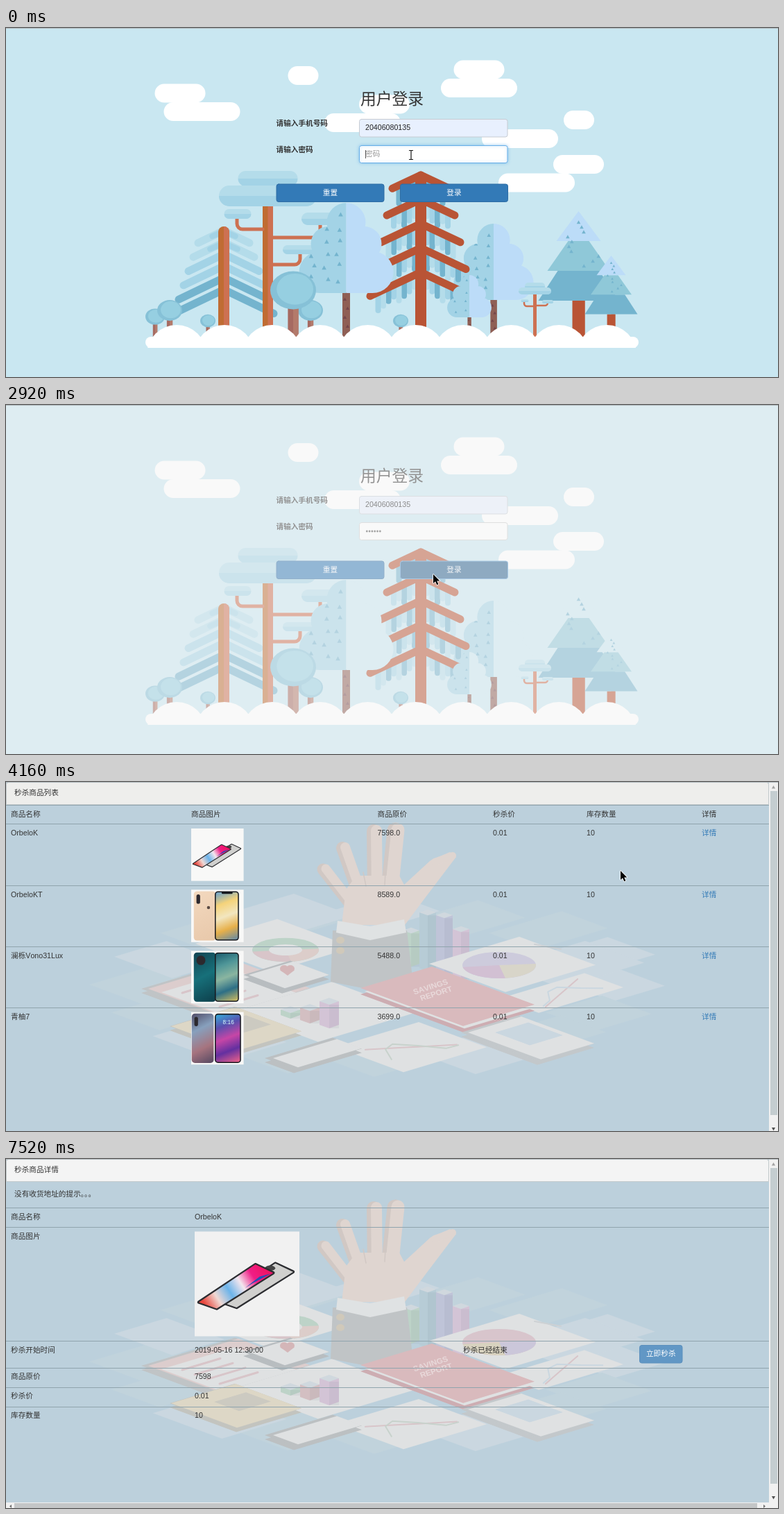
Animation of 1113x503 px, one loop 8000 ms. Source, as an HTML page with a canvas:

```html
<!DOCTYPE html>
<html lang="zh">
<head>
<meta charset="utf-8">
<style>
html, body { margin: 0; width: 100%; height: 100%; overflow: hidden; background: #c9e7f1; }
canvas { display: block; width: 1113px; height: 503px; }
</style>
</head>
<body>
<canvas id="stage" width="1113" height="503"></canvas>
<script>
const W = 1113, H = 503, LOOP = 8000;
const c = document.getElementById('stage').getContext('2d');
const SKY = '#c9e7f1', LIGHT = '#b4dcea', MID = '#a3d3e6', DEEP = '#74b4ce', TEAL = '#8fc8d8';
const RUST = '#b95435', CORAL = '#cd7152', OCHRE = '#c06c33', BROWN = '#8f5f55';
const FONT = "'Liberation Sans','Noto Sans CJK SC','Noto Sans CJK',sans-serif";
const UI = "'Open Sans','Noto Sans CJK SC','Noto Sans CJK',sans-serif";

// drawing helpers
function rect(x, y, w, h, fill) { c.fillStyle = fill; c.fillRect(x, y, w, h); }
function round(x, y, w, h, r, fill, stroke) {
  c.beginPath(); c.roundRect(x, y, w, h, r);
  if (fill) { c.fillStyle = fill; c.fill(); }
  if (stroke) { c.strokeStyle = stroke; c.lineWidth = 1; c.stroke(); }
}
function pill(x, y, w, h, fill) { round(x, y, w, h, h / 2, fill); }
function oval(x, y, rx, ry, fill, a = 0, b = Math.PI * 2) {
  c.beginPath();
  if (b - a < 6) c.moveTo(x, y);
  c.ellipse(x, y, rx, ry, 0, a, b); c.fillStyle = fill; c.fill();
}
function trace(points) {
  c.beginPath();
  for (const [x, y] of points) c.lineTo(x, y);
}
function poly(fill, ...points) { trace(points); c.closePath(); c.fillStyle = fill; c.fill(); }
function line(color, width, ...points) {
  trace(points); c.strokeStyle = color; c.lineWidth = width;
  c.lineCap = c.lineJoin = 'round'; c.stroke();
}
function text(s, x, y, { size = 10.65, color = '#333', bold = '', align = 'left', font = FONT } = {}) {
  c.font = `${bold} ${size}px ${font}`; c.fillStyle = color; c.fontKerning = 'none';
  c.textAlign = align; c.textBaseline = 'middle';
  c.fillText(s, x, y);
}
function tri(x, y, r, fill) { poly(fill, [x, y - r], [x + r, y + r * .8], [x - r, y + r * .8]); }
function gradient(x0, y0, x1, y1, colors) {
  const g = c.createLinearGradient(x0, y0, x1, y1);
  colors.forEach((k, i) => g.addColorStop(i / (colors.length - 1), k));
  return g;
}
function within(x, y, w, h, paint) {
  c.save(); c.beginPath(); c.rect(x, y, w, h); c.clip(); paint(); c.restore();
}
function random(seed) {
  return () => (seed = seed * 16807 % 2147483647) / 2147483647;
}

// forest
function cloud(x, y, shift) {
  pill(x, y, 110, 27, '#fff'); pill(x + shift, y - 26.5, 73, 27, '#fff');
}
function trunk(x, y, w, left, right = left) {
  rect(x, y, w, 446 - y, left); rect(x + w / 2, y, w / 2, 446 - y, right);
}
function shelf(cx, y, w, h) {
  pill(cx - w / 2, y, w, h, LIGHT);
  within(cx - w / 2, y + h / 2, w, h, () => pill(cx - w / 2, y, w, h, MID));
}
function puff(cx, top, h, pale) {
  const s = h / 130, shape = new Path2D(), rnd = random(h);
  trunk(cx - 5.5 * s, top + h - 1, 11 * s, BROWN);
  for (let i = 0; i < 4; i++) tri(cx + (i % 2 * 4 - 2) * s, top + h + (9 + i * 13) * s, 2.6 * s, '#74454a');
  const lobe = (x, y, r) => {
    shape.moveTo(cx + (x + r) * s, top + y * s);
    shape.arc(cx + x * s, top + y * s, r * s, 0, 7);
  };
  lobe(0, 28, 28);
  for (const d of [-1, 1]) { lobe(26 * d, 59, 25); lobe(38 * d, 100, 30); }
  shape.rect(cx - 26 * s, top + 30 * s, 52 * s, 60 * s);
  shape.rect(cx - 38 * s, top + 72 * s, 76 * s, 58 * s);
  c.save(); c.clip(shape);
  rect(cx - h, top, h, h, MID); rect(cx, top, h, h, pale);
  const gap = 18 * Math.max(s, .8);
  for (let y = 16 * s; y < h - 6; y += gap)
    for (let x = 8 * s; x < (18 + y / s * .38) * s; x += gap)
      tri(cx - x - rnd() * 7 * s, top + y + rnd() * 8 * s, Math.max(1.8, 3.3 * s), DEEP);
  c.restore();
}
function bush(x, y, r) {
  const w = r * .46;
  trunk(x - w / 2, y + r * .6, w, '#a66a61', '#b37a6b');
  oval(x, y, r, r * .83, '#86c1d7');
  oval(x + r * .08, y - r * .05, r * .8, r * .68, '#96cfe1');
}
function fir(cx, top, s, pale) {
  const rnd = random(cx);
  trunk(cx - 9 * s, top + 129 * s, 18 * s, RUST);
  [DEEP, TEAL, pale].forEach((fill, i) => {
    const y = top + (2 - i) * 43 * s, a = (30 - i * 15) * s, b = (58 - i * 13) * s;
    poly(fill, [cx - a, y], [cx + a, y], [cx + b, y + 43 * s], [cx - b, y + 43 * s]);
  });
  for (let i = 0; i < 10; i++) {
    const y = 16 + i * 7, side = i < 3 ? rnd() * .3 : rnd() - .5;
    tri(cx + side * y * 1.1 * s, top + y * s, 2.8 * s, DEEP);
  }
}
function bough(x0, y0, x1, y1, w) {
  c.beginPath(); c.moveTo(x0, y0);
  c.arcTo(x1, y0, x1, y1, 1.6 * w); c.lineTo(x1, y1);
  c.strokeStyle = CORAL; c.lineWidth = w; c.stroke();
}
function ribTree(cx) {
  for (let i = 0; i < 6; i++) {
    const y = 292 + i * 17, d = 37 + i * 7;
    for (const s of [-1, 1]) {
      line([LIGHT, MID, DEEP][i >> 1], 11, [cx, y], [cx + s * d, y + d * .48]);
      line([MID, DEEP][i >> 2], 8, [cx, y + 1], [cx + s * d * .45, y + d * .22]);
    }
  }
  round(cx - 8, 286, 16, 160, [8, 8, 0, 0], OCHRE);
  round(cx, 286, 8, 160, [0, 8, 0, 0], CORAL);
}
function redTree(cx) {
  const tones = [DEEP, MID, LIGHT];
  for (let i = 0; i < 5; i++) {
    const y = 212 + i * 35, reach = 41 + i * 8;
    for (const s of [-1, 1]) {
      for (let d = 9, j = i; d < reach - 4; d += 7.5, j++)
        round(cx + s * d - 4, y + d * .47, 8, 21 + j * 5 % 4 * 3, [0, 0, 4, 4], tones[j * 2 % 3]);
      line(RUST, 11, [cx, y], [cx + s * reach, y + reach * .47]);
    }
  }
  trunk(cx - 8, 212, 16, RUST);
}
function forest(pale) {
  rect(0, 0, W, H, SKY);
  cloud(627, 73, 18.5); cloud(227.5, 107, -13); cloud(459, 123, 50); cloud(710, 209.5, 79);
  pill(686, 146, 110, 27, '#fff');
  pill(406.5, 55, 44, 27, '#fff'); pill(804, 119, 44, 27, '#fff');

  bush(215, 416, 14); ribTree(314); bush(236, 407, 18); bush(291, 422, 11);
  trunk(370, 250, 15, OCHRE, CORAL);
  bough(370, 290, 333, 272, 5); bough(385, 302, 453, 280, 5); bough(385, 341, 424, 320, 5);
  shelf(377.5, 206, 86, 22); shelf(377.5, 227, 141, 30);
  shelf(334, 261, 39, 14); shelf(453, 266, 54, 18); shelf(424, 313, 50, 13);

  fir(825.5, 264, 1, pale); fir(872.5, 328, .655, pale);
  puff(703, 282, 110, pale); redTree(598); puff(490.5, 252, 130, pale); puff(668, 356, 61, pale);
  bush(439, 407, 18); bush(414, 378, 33); bush(569, 422, 11);

  trunk(760, 382, 5, CORAL);
  bough(760, 401, 747, 394, 2.5); bough(765, 400, 781, 395, 2.5);
  shelf(762.5, 367, 29, 10); shelf(762.5, 374, 47, 10); shelf(748, 391, 11, 4); shelf(781, 392, 16, 5);

  pill(201, 445, 711, 16, '#fff');
  within(201, 420, 711, 41, () => {
    for (let i = 0; i < 10; i++) oval(246 + i * 68.9, 471, 43, 43, '#fff');
  });
}

function button(label, x, y, w, fill, edge) {
  round(x, y, w, 25.5, 3, fill, edge);
  text(label, x + w / 2, y + 13, { color: '#fff', align: 'center' });
}
function login(t) {
  const faded = t >= 2920, clicked = t >= 2780, hover = t >= 2640;
  forest(faded ? SKY : '#bcdcf8');
  text('用户登录', 556.5, 103.5, { size: 22.8, align: 'center' });
  text('请输入手机号码', 389.5, 138.5, { bold: 'bold' });
  text('请输入密码', 389.5, 176.5, { bold: 'bold' });
  round(509.5, 131.5, 213.5, 25.5, 3, '#e8f0fe', '#c6cbd2');
  text('20406080135', 518, 144, { color: '#222' });
  if (!clicked) { c.shadowColor = 'rgba(102,175,233,.6)'; c.shadowBlur = 4; }
  round(509.5, 169.5, 213.5, 25, 3, '#fff', clicked ? '#ccc' : '#66afe9');
  c.shadowBlur = 0; c.shadowColor = 'transparent';
  const typed = [680, 820, 1100, 1370, 1510, 1650].filter(k => t >= k).length;
  if (!typed) text('密码', 518, 182, { color: '#999' });
  for (let i = 0; i < typed; i++) oval(520.3 + i * 3.8, 182, 1.4, 1.4, '#555');
  if (!clicked) rect(Math.round(517.5 + typed * 3.8), 176, 1, 12, '#555');
  button('重置', 390, 225, 155, '#337ab7', '#2e6da4');
  button('登录', 568.5, 225, 155, hover ? '#286090' : '#337ab7', clicked ? '#5f9fd6' : '#2e6da4');
  if (faded) rect(0, 0, W, H, 'rgba(243,243,243,.5)');
}

// desk: every sheet is spanned by p (down right) and q (up right)
const iso = (x, y, p, q) => [x + p + q, y + p * .37 - q * .3];
function sheet(x, y, p, q, fill) {
  poly(fill, [x, y], iso(x, y, p, 0), iso(x, y, p, q), iso(x, y, 0, q));
}
function slab(x, y, p, q, fill, edge, rim) {
  sheet(x, y + 6, p, q, edge); sheet(x, y, p, q, edge);
  sheet(x + rim * 2, y, p - rim, q - rim, fill);
}
function plot(x, y, p, q, color, f) {
  const points = [];
  for (let k = .15; k < .9; k += .14) points.push(iso(x, y, p * f(k), q * k));
  line(color, 2, ...points);
}
function pie(x, y, r, tones) {
  tones.forEach((fill, i) => oval(x, y, r, r * .36, fill, i ? i * 1.5 - 1.6 : 0, i ? i * 1.5 : 7));
}
function bars(x, y, w, heights, tones) {
  heights.forEach((h, i) => {
    const bx = x + i * w, by = y + i * w * .25, d = w * .18;
    rect(bx, by - h, w, h, tones[i]);
    poly(tones[i], [bx, by], [bx + w / 2, by + d], [bx + w, by]);
    poly('#d0d8de', [bx, by - h], [bx + w / 2, by - h - d], [bx + w, by - h], [bx + w / 2, by - h + d]);
    rect(bx + w / 2, by - h + d, w / 2, h, 'rgba(90,100,110,.07)');
  });
}
function hand(skin, shade) {
  const finger = (x, y, bx, by, w) => {
    line(shade, w, [x - 2, y + 1], [bx - 2, by]);
    line(skin, w - 4, [x + 2, y], [bx + 2, by]);
  };
  finger(459, 125, 500, 178, 17); finger(487, 94, 512, 165, 18);
  finger(532, 70, 533, 165, 20); finger(563, 69, 553, 165, 23);
  poly(skin, [484, 206], [490, 155], [505, 135], [567, 135], [574, 148], [612, 113], [640, 101], [649, 108], [608, 162], [575, 206]);
  line(skin, 10, [618, 115], [644, 106]);
  line(shade, 1.5, [519, 150], [515, 130]); line(shade, 1.5, [546, 148], [547, 130]);
}
function desk(rich, tones) {
  const far = rich ? '#c1d3dc' : '#c6ced2', soft = rich ? '#cad7e0' : '#cfd8e1';
  const paper = rich ? '#dfe1e2' : '#ebecea', grey = '#c0c4c6', blush = '#d8c5c9';
  const green = rich ? '#bdd3c8' : '#c0c9cc', violet = rich ? '#bfc4d8' : '#bfc7cf';
  const pink = rich ? '#d3c4d6' : '#cbc8cf', rnd = random(77);
  rect(0, 0, W, H, '#bcd0dc');
  for (let i = 0; i < 16; i++) {
    const a = i * Math.PI / 8, p = 65 + rnd() * 35, q = 70 + rnd() * 35;
    sheet(545 + 335 * Math.cos(a) - (p + q) / 2, 292 + 105 * Math.sin(a), p, q, i % 3 ? far : soft);
  }
  sheet(715, 265, 85, 120, soft); sheet(285, 200, 85, 130, soft);
  sheet(273, 233, 110, 118, paper);
  pie(403, 242, 48, [green, '#dccdca', blush]); oval(403, 242, 24, 8, paper);
  slab(195, 298, 108, 135, rich ? '#dccdcd' : '#dddcda', grey, 5);
  sheet(224, 303, 88, 106, paper);
  for (let k = 15; k < 85; k += 18) line(k % 4 ? blush : grey, 3, iso(224, 303, k, 15), iso(224, 303, k, 70));
  sheet(330, 330, 120, 140, paper);
  slab(342, 278, 56, 68, paper, '#b8bdc0', 4);
  for (const x of [401, 410]) oval(x, 269, 6, 5, '#d4b6b8');
  poly('#d4b6b8', [395, 271], [416, 271], [406, 279]);
  bars(396, 336, 28, [8, 18, 34], [green, '#d3bfc2', pink]);
  slab(236, 352, 96, 94, rich ? '#ddd7c6' : '#dbd0c4', '#c3c4bf', 1);
  sheet(300, 350, 36, 46, '#cccac1');
  bars(572, 262, 24, [48, 80, 82, 68], [green, rich ? '#b7ccd6' : '#c0c6ca', violet, pink]);

  sheet(610, 262, 110, 130, paper);
  pie(711, 264, 53, tones);
  line('#cdd1d4', 2, [762, 234], [800, 241]);
  sheet(712, 312, 56, 122, paper);
  plot(712, 312, 56, 122, blush, k => 1 - k); plot(712, 312, 56, 122, soft, k => .5 + .3 * Math.sin(k * 9));

  hand(rich ? '#dfd5d0' : '#e1d3ca', rich ? '#d1c8c4' : '#d3c8c2');
  poly(grey, [471, 214], [578, 214], [586, 282], [540, 302], [468, 288]);
  poly(rich ? '#dfe2e3' : '#e8e9e8', [478, 200], [525, 208], [574, 198], [577, 217], [525, 228], [476, 217]);
  for (const y of [228, 243]) oval(482, y, 6, 5, '#d0c9ba');

  sheet(511, 306, 148, 103, '#cdadb2'); sheet(517, 302, 144, 101, paper);
  sheet(511, 297, 148, 103, '#d9babd');
  c.save(); c.translate(615, 300); c.transform(.95, -.3, .35, .9, 0, 0);
  ['SAVINGS', 'REPORT'].forEach((s, i) =>
    text(s, i * 4 - 1, i * 12 - 5, { size: 11.5, bold: 'bold', color: '#e8d9da', align: 'center' }));
  c.restore();

  sheet(475, 382, 98, 120, paper);
  plot(475, 382, 98, 120, blush, k => .15 + k * .7);
  plot(475, 382, 98, 120, '#c8d2cc', k => .55 + .25 * Math.cos(k * 8));
  slab(373, 398, 42, 98, paper, '#bcc0c2', 6);
  slab(656, 361, 110, 82, paper, '#c3c8cb', 5);
  sheet(705, 361, 50, 48, soft);
}

// product pictures on a 100 by 100 square
const PHONES = [
  { glow: ['#e8463c', '#f0d9d4', '#6cb4ea', '#f3e6ee', '#f01d86', '#ef1466'] },
  { body: ['#f3d9bf', '#e8c8aa'], glow: ['#6fa3c8', '#f5d37a', '#f2e6c0', '#e7b04a', '#6a8ba0'] },
  { body: ['#123f4e', '#17707a', '#0d3f4b'], glow: ['#1d5f70', '#4f9698', '#8ab5a0', '#2d6f86', '#c8b862'] },
  { body: ['#4b4560', '#87a0bd', '#a6747f', '#514660'], glow: ['#38a8d8', '#5a4fae', '#c646a6', '#6330a0', '#e05d8c'] }
];
function leaning(x, y, fill) {
  const p = [[x, y], [x + 54, y - 36], [x + 71, y - 28], [x + 17, y + 6]];
  line('#2b2c30', 3, ...p, p[0]); poly(fill, ...p);
}
function photo(kind, x, y, size, bg) {
  const { body, glow } = PHONES[kind], wide = kind === 3 ? 50 : 46;
  c.save(); c.translate(x, y); c.scale(size / 100, size / 100);
  rect(0, 0, 100, 100, bg);
  if (!kind) {
    leaning(23, 66.5, '#d0d0ce');
    oval(72, 35, 5, 2.5, '#444');
    leaning(4, 67.5, gradient(10, 70, 66, 34, glow));
    poly('#2450b5', [48, 54], [62, 43], [73, 40], [56, 49]);
  } else {
    round(51 - wide, 3, 42, 94, 6, gradient(0, 0, 50, 95, body));
    pill(56 - wide, 9, kind === 2 ? 17 : 7, 18, '#2c292e');
    if (kind === 1) oval(33, 34, 3, 3, '#5a4a43');
    round(45, 3, wide, 94, 6, '#16181d');
    round(47, 5, wide - 4, 90, 4, gradient(50, 5, 85, 95, glow));
    if (kind === 1) pill(58, 4, 21, 4, '#16181d');
    if (kind === 3) text('8:16', 71, 20, { size: 11, color: '#dff', align: 'center' });
  }
  c.restore();
}

// browser pieces
function rule(y) { rect(0, y, 1100, 1, '#90a4ad'); }
function scrollbar(end) {
  rect(1100, 0, 13, H, '#f1f1f1');
  rect(1102, 13, 10, end - 13, '#c4cdd0');
  tri(1106.5, 7.5, 2.6, '#a3a3a3');
  tri(1106.5, end + 20, -2.6, '#505050');
}
function status(s, bg) {
  round(-4, 490, 372.5, 20, 3, bg, '#b9c3c8');
  text(s, 1, 498.5, { size: 9, color: '#666', font: UI });
}
function heading(s, bg) {
  round(.5, .5, 1099, 32, [3, 3, 0, 0], bg, '#c3cacc');
  text(s, 12, 16.5);
}
const WAITING = '正在等待 shelfnode 的响应...', LINK = 'shelfnode:7301/wares_detail.htm?waresId=1';
const COLS = [7, 267, 535.5, 702, 837, 1003];

function list(t) {
  const rich = t >= 4030, hover = t >= 4470;
  desk(rich, rich ? ['#cdcbdc', '#d8d5c9', '#d2c0d3'] : ['#c4cfd9', '#cdd6dd', '#bfcad4']);
  heading('秒杀商品列表', '#eeeeec');
  const row = (cells, y) => cells.forEach((s, i) => text(s, COLS[i], y));
  row(['商品名称', '商品图片', '商品原价', '秒杀价', '库存数量', '详情'], 47);
  rule(33);
  const goods = [['OrbeloK', '7598.0'], ['OrbeloKT', '8589.0'], ['澜栎Vono31Lux', '5488.0'], ['青柚7', '3699.0']];
  goods.forEach(([name, price], i) => {
    const y = 74.5 + i * 88.2, active = hover && !i;
    row([name, '', price, '0.01', '10'], y);
    text('详情', COLS[5], y, { color: active ? '#23527c' : '#337ab7' });
    if (active) rect(COLS[5], 79, 21, 1, '#23527c');
    rule(Math.round(y - 14.2));
    photo(i, 267, y - 7.5, 75.6, rich ? '#f8f8f7' : '#eeeeec');
  });
  scrollbar(480);
  if (!rich) status(WAITING, '#eeeeec');
  else if (hover) status(LINK, '#f8f8f7');
}

function detail(t) {
  desk(true, t < 5970 ? ['#c9ced3', '#d0d3d5', '#d6d1c1'] : ['#d8c5cc', '#cbc7da', '#d8d2bf']);
  heading('秒杀商品详情', '#f4f4f4');
  text('没有收货地址的提示。。。', 12, 51);
  const rows = [['商品名称', 'OrbeloK', 28], ['商品图片', '', 164], ['秒杀开始时间', '2019-05-16 12:30:00', 38.5],
    ['商品原价', '7598', 28], ['秒杀价', '0.01', 28], ['库存数量', '10', 28]];
  let y = 70;
  for (const [label, value, height] of rows) {
    rule(Math.round(y)); text(label, 7, y + 14); text(value, 272, y + 14);
    y += height;
  }
  text('秒杀已经结束', 659, 276);
  photo(0, 272, 104.5, 151, '#f1f1f1');
  button('立即秒杀', 913.5, 268.5, 61.5, '#6197c5', '#5c90bd');
  scrollbar(468);
  rect(0, 495, W, 8, '#f1f1f1');
  rect(12, 496, 1071, 7, '#c4c6c7');
  for (const [x, d] of [[8, -3], [1092, 3]]) poly('#707070', [x, 498], [x, 503], [x + d, 500.5]);
  if (t < 5550) status(LINK, '#f8f8f7');
}

// pointers
const POINTERS = {
  beam() {
    line('#111', 1.2, [0, -6], [0, 6]);
    for (const y of [-6.5, 6.5]) line('#111', 1.2, [-2.5, y], [2.5, y]);
  },
  arrow() {
    const p = [[0, 0], [0, 13], [3, 10.3], [5.3, 15.3], [7.4, 14.3], [5.2, 9.6], [9.3, 9.4]];
    line('#fff', 1.5, ...p, p[0]); poly('#000', ...p);
  },
  hand() {
    const p = [[-1.5, 9], [-1.5, 0], [1.5, 0], [1.5, 5], [7, 6.5], [7, 11], [5, 15], [-1, 15], [-5, 9], [-4, 7.5]];
    line('#111', 1.6, ...p, p[0]); poly('#fff', ...p);
  },
  barred() {
    c.beginPath(); c.arc(7.5, 8, 6, 0, 7); c.moveTo(3.3, 3.8); c.lineTo(11.7, 12.2);
    c.strokeStyle = '#fff'; c.lineWidth = 3.4; c.stroke();
    c.strokeStyle = '#111'; c.lineWidth = 2; c.stroke();
  }
};
// travel in n hops, the first at t0 and the last at t1
function glide(t, t0, t1, n, [x0, y0], [x1, y1]) {
  const hop = Math.floor((t - t0) / (t1 - t0) * (n - 1) + 1e-6) + 1;
  const k = Math.max(0, Math.min(n, hop)) / n, e = k * k * (3 - 2 * k);
  return [Math.round(x0 + (x1 - x0) * e), Math.round(y0 + (y1 - y0) * e)];
}
function pointer(t) {
  const field = [584, 183], far = [648, 199], submit = [616, 244], link = [1011, 74];
  const rest = [1002, 85], buy = [938, 268], exit = [45, 0];
  if (t < 400) return ['beam', glide(t, 120, 260, 2, field, far)];
  if (t < 2360) return ['beam', [584, 184]];
  if (t < 3450) return ['arrow', glide(t, 2360, 2640, 3, field, submit)];
  if (t < 4470) return ['arrow', glide(t, 3450, 4470, 8, submit, link)];
  if (t < 5410) return ['hand', link];
  if (t < 5840) return ['arrow', glide(t, 5410, 5710, 3, link, rest)];
  if (t < 6510) return ['arrow', glide(t, 5840, 6360, 5, rest, buy)];
  if (t < 6820) return ['barred', buy];
  if (t < 7520) return ['arrow', glide(t, 6820, 7380, 5, buy, exit)];
  return null;
}

function draw(t) {
  (t < 3200 ? login : t < 5140 ? list : detail)(t);
  rect(0, 0, W, 1, '#b3bcc0');
  if (t >= 3070 && t < 3200) status(WAITING, '#eeeeec');
  const p = pointer(t);
  if (!p) return;
  c.save(); c.translate(...p[1]); POINTERS[p[0]](); c.restore();
}

let start;
function tick(now) {
  start ??= now;
  draw((now - start) % LOOP);
  requestAnimationFrame(tick);
}
draw(0);
requestAnimationFrame(tick);
</script>
</body>
</html>
```
